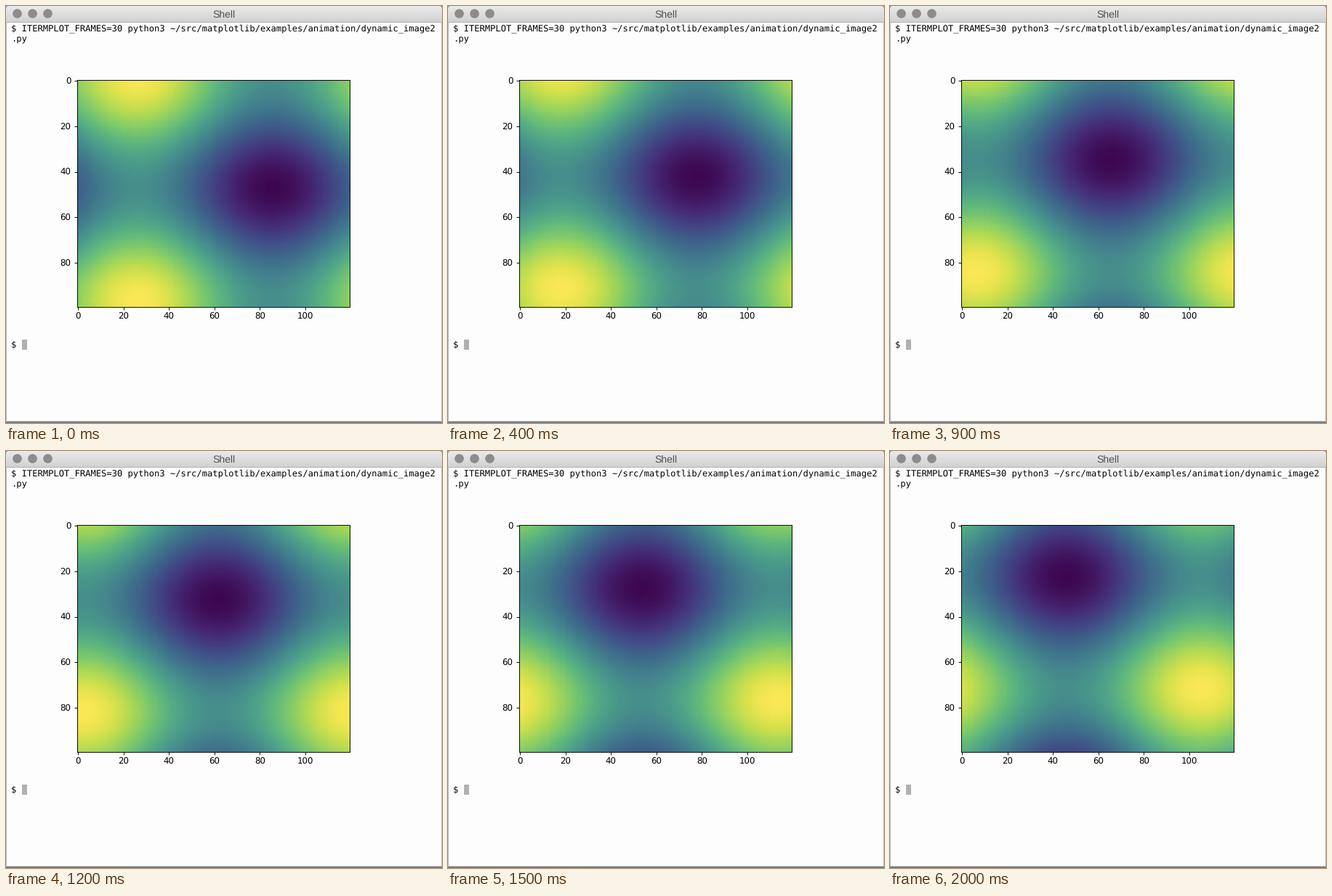
A matplotlib script that plays this animation: 600x575 px, repeating every 2.1 s.

```python
import numpy as np
import matplotlib.pyplot as plt
from matplotlib.animation import FuncAnimation
from matplotlib.colors import ListedColormap
from matplotlib.patches import Circle, FancyBboxPatch, Rectangle

W, H, DPI = 600, 575, 100
FRAMES, INTERVAL = 21, 100
PT = 72 / DPI            # points per pixel
CELL_X, MONO = 7, 12.17  # terminal left margin and font size in pixels
CELL_W = MONO * 0.602
SCALE = 0.8465           # plot pixels relative to a 100 dpi figure

plt.rcParams["text.hinting"] = "none"
plt.rcParams["text.parse_math"] = False


def display_p3(rgb):
    """Convert sRGB colours to Display P3 component values."""
    lin = np.where(rgb <= 0.04045, rgb / 12.92, ((rgb + 0.055) / 1.055) ** 2.4)
    m = np.array([[0.8225, 0.1774, 0.0],
                  [0.0332, 0.9669, 0.0],
                  [0.0171, 0.0724, 0.9108]])
    lin = np.clip(lin @ m.T, 0, 1)
    return np.clip(np.where(lin <= 0.0031308, lin * 12.92,
                            1.055 * lin ** (1 / 2.4) - 0.055), 0, 1)


fig = plt.figure(figsize=(W / DPI, H / DPI), dpi=DPI, facecolor="#8c8c8c")
win = fig.add_axes([0, 0, 1, 1])
win.set_xlim(0, W)
win.set_ylim(H, 0)
win.axis("off")


def rect(x, y, w, h, color):
    win.add_patch(Rectangle((x, y), w, h, fc=color, lw=0, antialiased=False))


def label(x, y, s, size, font, color="black", ha="left"):
    win.text(x, y, s, fontsize=size * PT, family=font, color=color,
             ha=ha, va="baseline")


# Window frame and title bar
bar = FancyBboxPatch((4, 4), W - 8, 40, boxstyle="round,pad=0,rounding_size=4",
                     mutation_aspect=1, fc="none", ec="none")
bar.set_bounds(0, 0, W, 40)
win.add_patch(bar)
shade = win.imshow(np.linspace(0.915, 0.82, 22).reshape(-1, 1), cmap="gray",
                   vmin=0, vmax=1, extent=(0, W, 22, 0), aspect="auto")
shade.set_clip_path(bar)
win.set_xlim(0, W)
win.set_ylim(H, 0)
rect(0, 22, W, 1, "#b3b3b3")
rect(0, 23, W, 549, "#fdfdfd")
rect(0, 23, 1, 549, "#bcbcbc")
rect(W - 1, 23, 1, 549, "#bcbcbc")
rect(0, 572, W, 1, "#c4c4c4")
rect(0, 573, W, 2, "#7c7c7c")
for cx in (15.5, 36.5, 57.5):
    win.add_patch(Circle((cx, 10.5), 6.3, fc="#8d8b8c", lw=0))
label(300, 16, "Shell", 14, "Liberation Sans", "#505050", "center")

# Terminal text
lines = [
    (35.5, "$ ITERMPLOT_FRAMES=30 python3 "
           "~/src/matplotlib/examples/animation/dynamic_image2"),
    (49.5, ".py"),
    (470.5, "$"),
]
for y, s in lines:
    label(CELL_X, y, s, MONO, "DejaVu Sans Mono")
rect(CELL_X + 2 * CELL_W, 460, CELL_W, 13.5, "#b0b0b0")

# Plot
L, R, T, B = 97.5, 472.9, 101.9, 414.9
ax = fig.add_axes([L / W, 1 - B / H, (R - L) / W, (B - T) / H])
xs = np.linspace(0, 2 * np.pi, 120)
ys = np.linspace(0, 2 * np.pi, 100).reshape(-1, 1)


def field(k):
    return np.sin(xs + k * np.pi / 15) + np.cos(ys + k * np.pi / 20)


viridis = plt.get_cmap("viridis")(np.arange(256))[:, :3]
image = ax.imshow(field(1), cmap=ListedColormap(display_p3(viridis)),
                  aspect="auto")
ax.set_xticks(range(0, 101, 20))
ax.set_yticks(range(0, 81, 20))
ax.tick_params(length=3.5 * SCALE, pad=3.5 * SCALE, width=0.8 * SCALE,
               labelsize=10 * SCALE, labelfontfamily="DejaVu Sans")
for spine in ax.spines.values():
    spine.set_linewidth(0.8 * SCALE)


def update(n):
    # The wave advances on every second tick
    image.set_data(field(1 + (n + 1) // 2))
    image.autoscale()
    return image,


anim = FuncAnimation(fig, update, frames=FRAMES, interval=INTERVAL,
                     repeat=True, repeat_delay=0, blit=False)
plt.show()
```
